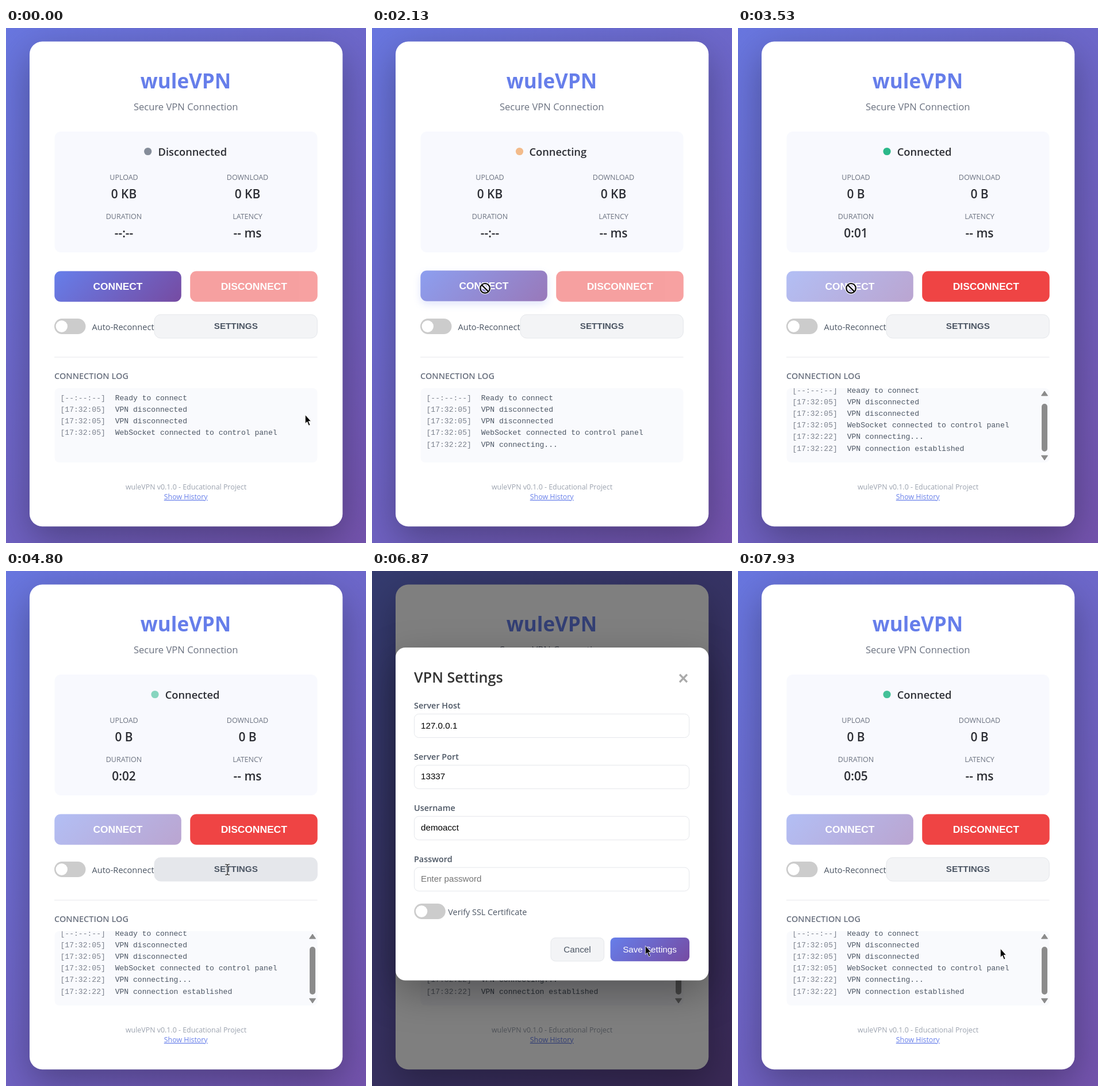
Write an HTML page that moves like this. It is 626 px wide and 895 px high and loops after 8000 ms.

```html
<!DOCTYPE html>
<html lang="en">
<head>
<meta charset="utf-8">
<title>VPN panel</title>
<style>
  html, body { margin: 0; width: 100%; height: 100%; overflow: hidden; background: #6e65c6; }
  svg { display: block; width: 100%; height: 100%; }
  text { font-family: "Open Sans", "Noto Sans", sans-serif; white-space: pre; }
  .b { font-weight: 700; }
  .s { font-weight: 600; }
  .a { font-family: "Liberation Sans", Arial, sans-serif; }
  .m { font-family: "Liberation Mono", "Courier New", monospace; }
  .c { text-anchor: middle; }
</style>
</head>
<body>
<svg id="stage" viewBox="0 0 626 895" xmlns="http://www.w3.org/2000/svg"></svg>
<script>
const INK = '#2b2d33', SLATE = '#4b5563', GRAY = '#6b7280', LINE = '#e5e7eb', PALE = '#f3f4f6', BRAND = '#667eea';

const rect = (x, y, w, h, r, fill, more = '') =>
  `<rect x="${x}" y="${y}" width="${w}" height="${h}" rx="${r}" fill="${fill}" ${more}/>`;
const text = (x, y, size, fill, cls, str, more = '') =>
  `<text x="${x}" y="${y}" font-size="${size}" fill="${fill}" class="${cls}" ${more}>${str}</text>`;
const border = `stroke="${LINE}" stroke-width="1"`;

// Diagonal brand gradient covering a box, corner to corner like CSS 135deg
const grad = (id, x, y, w, h) => {
  const d = (w + h) / 4, cx = x + w / 2, cy = y + h / 2;
  return `<linearGradient id="${id}" gradientUnits="userSpaceOnUse" x1="${cx - d}" y1="${cy - d}" x2="${cx + d}" y2="${cy + d}">
    <stop stop-color="#667eea"/><stop offset="1" stop-color="#764ba2"/></linearGradient>`;
};
const toggle = (x, y) =>
  rect(x, y, 54.5, 27, 13.5, '#ccc') + `<circle cx="${x + 12.8}" cy="${y + 13.5}" r="10.2" fill="#fff"/>`;

const stat = (x, y, label, id, value) =>
  text(x, y, 12.5, GRAY, 'c', label) + text(x, y + 31.7, 20.8, INK, 's c', value, id && `id="${id}"`);

const logs = [
  ['--:--:--', 'Ready to connect'],
  ['17:32:05', 'VPN disconnected'],
  ['17:32:05', 'VPN disconnected'],
  ['17:32:05', 'WebSocket connected to control panel'],
  ['17:32:22', 'VPN connecting...'],
  ['17:32:22', 'VPN connection established']
];
const logLine = ([time, msg], i) => {
  const y = 647 + i * 20.15;
  return `<g id="log${i}">` + text(94.5, y, 13.05, '#7b818d', 'm', `[${time}]`) +
    text(189.7, y, 13.05, SLATE, 'm', msg) + '</g>';
};

const fields = [
  ['Server Host', '127.0.0.1', '#000'],
  ['Server Port', '13337', '#000'],
  ['Username', 'demoacct', '#000'],
  ['Password', 'Enter password', '#757575']
];
const field = ([label, value, fill], i) => {
  const y = i * 88.9;
  return text(73, 239 + y, 14.4, SLATE, 's', label) +
    rect(73.5, 248.5 + y, 478, 41, 8, '#fff', border) +
    text(85, 273.5 + y, 15.2, fill, 'a', value);
};

const panel = `
  ${rect(0, 0, 626, 895, 0, 'url(#page)')}
  ${rect(41, 23.5, 544.3, 842.7, 22, '#fff', 'filter="url(#shadow)"')}
  ${text(312.5, 105, 35, BRAND, 'b c', 'wuleVPN')}
  ${text(312.7, 142.5, 16.6, GRAY, 'c', 'Secure VPN Connection')}
  ${rect(84.5, 180, 457, 210, 11, '#f8f9fe')}
  <circle id="dot" cy="214.5" r="6.6"/>
  ${text(0, 222.3, 18.3, INK, 's', '', 'id="status"')}
  ${stat(205, 264, 'UPLOAD', 'up', '')}
  ${stat(420, 264, 'DOWNLOAD', 'down', '')}
  ${stat(205, 332, 'DURATION', 'time', '')}
  ${stat(420, 332, 'LATENCY', '', '-- ms')}
  <g id="lift">
    ${rect(84.5, 428, 220, 53, 11, BRAND, 'id="glow" filter="url(#soft)"')}
    <g id="connect">
      ${rect(84.3, 422.5, 220.5, 53.3, 11, '#fff')}
      <g id="face">${rect(84.3, 422.5, 220.5, 53.3, 11, 'url(#conn)')}</g>
      ${text(194.5, 455, 17.4, '#fff', 'a b c', 'CONNECT')}
    </g>
  </g>
  <g id="disconnect">
    ${rect(320.2, 422.5, 221.5, 53.3, 11, '#ef4444')}
    ${text(431.3, 455, 17.4, '#fff', 'a b c', 'DISCONNECT')}
  </g>
  ${toggle(84, 505)}
  ${text(149.5, 524.5, 14.6, SLATE, '', 'Auto-Reconnect')}
  ${rect(258, 498, 283.3, 41, 11, PALE, border + ' id="settings"')}
  ${text(399.8, 522.6, 15.2, SLATE, 'a b c', 'SETTINGS')}
  ${rect(84, 571.5, 457.5, 1, 0, LINE)}
  ${text(84, 610.3, 14.5, GRAY, 's', 'CONNECTION LOG')}
  ${rect(84.5, 626, 457, 129, 8, '#f9fafd')}
  <g clip-path="url(#logClip)"><g id="lines">${logs.map(logLine).join('')}</g></g>
  <g id="bar" fill="#8b8b8b">
    ${rect(528, 653, 10, 83, 5, '#8b8b8b')}
    <path d="M533 631 L538.5 639 H527.5Z M533 751 L538.5 743 H527.5Z" stroke="#8b8b8b" stroke-linejoin="round"/>
  </g>
  ${text(313, 802, 12.4, '#9ca3af', 'c', 'wuleVPN v0.1.0 - Educational Project')}
  ${text(312.7, 819, 12.4, BRAND, 'c', 'Show History', 'text-decoration="underline"')}`;

const modal = `<g id="modal">
  ${rect(0, 0, 626, 895, 0, '#000', 'opacity=".5"')}
  ${rect(41, 133, 544.3, 578.5, 17, '#fff', 'filter="url(#shadow)"')}
  ${text(73, 194, 25.2, '#333', 's', 'VPN Settings')}
  ${text(541.3, 197, 30.5, '#aaa', 'a b c', '×')}
  ${fields.map(field).join('')}
  ${toggle(73.3, 578)}
  ${text(132.3, 597.5, 14.4, SLATE, '', 'Verify SSL Certificate')}
  ${rect(311, 637.5, 92.5, 40.5, 8, PALE, border)}
  ${text(357, 663, 15.2, SLATE, 'a c', 'Cancel')}
  ${rect(414.5, 637, 137.5, 41.3, 8, 'url(#save)')}
  ${text(483, 663, 15.2, '#fff', 'a c', 'Save Settings')}
</g>`;

const ban = 'M8.3 0 A8.3 8.3 0 1 1 -8.3 0 A8.3 8.3 0 1 1 8.3 0 M-5.8 -5.8 L5.8 5.8';
const beam = 'M-4 -9 H-1.5 L0 -8 L1.5 -9 H4 M0 -8 V8 M-4 9 H-1.5 L0 8 L1.5 9 H4';
const stroked = (id, d, outer, inner) =>
  `<g id="${id}" fill="none"><path d="${d}" stroke="#fff" stroke-width="${outer}"/><path d="${d}" stroke="#000" stroke-width="${inner}"/></g>`;
const cursor = `<g id="cursor">
  <path id="arrow" d="M.3 .3 V15.4 L3.7 12.2 L6.4 19 L8.9 18 L6.1 11.4 H10.4Z" fill="#000" stroke="#fff" stroke-width=".8"/>
  ${stroked('ban', ban, 4.4, 2.2)}
  ${stroked('beam', beam, 2, 1.1)}
</g>`;

// The page gradient spans a window wider than the stage
document.getElementById('stage').innerHTML = `<defs>
  ${grad('page', -327, 0, 1280, 895)}${grad('conn', 84.5, 423, 220, 52.5)}${grad('save', 414.5, 637, 137.5, 41.3)}
  <filter id="shadow" filterUnits="userSpaceOnUse" x="-150" y="-150" width="926" height="1200" color-interpolation-filters="sRGB">
    <feDropShadow dx="0" dy="21.8" stdDeviation="32.6" flood-color="#000" flood-opacity=".3"/></filter>
  <filter id="soft" x="-20%" y="-60%" width="140%" height="220%"><feGaussianBlur stdDeviation="7"/></filter>
  <clipPath id="logClip">${rect(84.5, 626, 457, 129, 8, '#000')}</clipPath>
</defs>${panel}${modal}${cursor}`;

const el = id => document.getElementById(id);
const show = (id, on) => el(id).setAttribute('visibility', on ? 'visible' : 'hidden');
const set = (id, attrs) => { for (const k in attrs) el(id).setAttribute(k, attrs[k]); };
const write = (id, str) => { if (el(id).textContent !== str) el(id).textContent = str; };
const ramp = (t, from, len) => {
  const p = Math.min(1, Math.max(0, (t - from) / len));
  return p * p * (3 - 2 * p);
};

const LOOP = 8000, CLICK = 1980, UP = 2400, OPEN = 4865, CLOSE = 6930;

// start, label, dot x, text x, dot colour, time of the faintest pulse
const states = [
  [0, 'Disconnected', 246.7, 264.5, '#7f8795', 800],
  [CLICK, 'Connecting', 256.5, 273.5, '#f1b27a', 800],
  [UP, 'Connected', 259, 276.7, '#2ab88a', 4600]
];
// time, x, y of the pointer hot spot
const path = [
  [0, 520, 672], [65, 520, 672], [66, 510, 661], [1270, 510, 661], [1820, 196.6, 452.3],
  [3870, 196.6, 452.3], [4600, 386, 521], [4700, 386, 521], [4726, 385, 519],
  [5780, 385, 519], [5798, 388, 525], [6590, 531, 658], [6665, 465, 649], [6725, 475, 651],
  [7000, 475, 651], [7660, 471, 653], [7920, 456, 656], [LOOP, 456, 656]
];
const shapes = [[0, 'arrow'], [2060, 'ban'], [3960, 'arrow'], [4726, 'beam'], [6020, 'arrow']];
const current = (list, t) => list.filter(s => s[0] <= t).pop();

function pointer(t) {
  const i = path.findIndex(p => p[0] > t);
  const [a, x, y] = path[i - 1], [b, u, v] = path[i];
  const k = ramp(t, a, b - a);
  return [x + (u - x) * k, y + (v - y) * k];
}

function render(t) {
  const live = t >= UP;
  const [, label, dotX, textX, color, low] = current(states, t);
  write('status', label);
  set('status', { x: textX });
  set('dot', { cx: dotX, fill: color, opacity: 0.75 - 0.25 * Math.cos((t - low) / 1000 * Math.PI) });
  write('up', live ? '0 B' : '0 KB');
  write('down', live ? '0 B' : '0 KB');
  write('time', live ? '0:0' + Math.floor((t - UP) / 1000) : '--:--');

  const hover = ramp(t, 1690, 280) - ramp(t, CLICK, 300);
  set('lift', { transform: `translate(0 ${-2 * hover})` });
  set('glow', { opacity: 0.4 * hover });
  set('face', { opacity: 1 - 0.5 * ramp(t, CLICK, 300) });
  set('disconnect', { opacity: 0.5 + 0.5 * ramp(t, UP, 300) });
  set('settings', { fill: t >= 4726 && t < OPEN ? LINE : PALE });

  show('log4', t >= CLICK);
  show('log5', live);
  show('bar', live);
  set('lines', { transform: `translate(0 ${live ? -13.2 : 0})` });
  show('modal', t >= OPEN && t < CLOSE);

  const shape = current(shapes, t)[1];
  for (const id of ['arrow', 'ban', 'beam']) show(id, id === shape);
  set('cursor', { transform: `translate(${pointer(t)})` });
}

const start = performance.now();
function tick(now) {
  render(Math.max(0, now - start) % LOOP);
  requestAnimationFrame(tick);
}
render(0);
requestAnimationFrame(tick);
</script>
</body>
</html>
```
